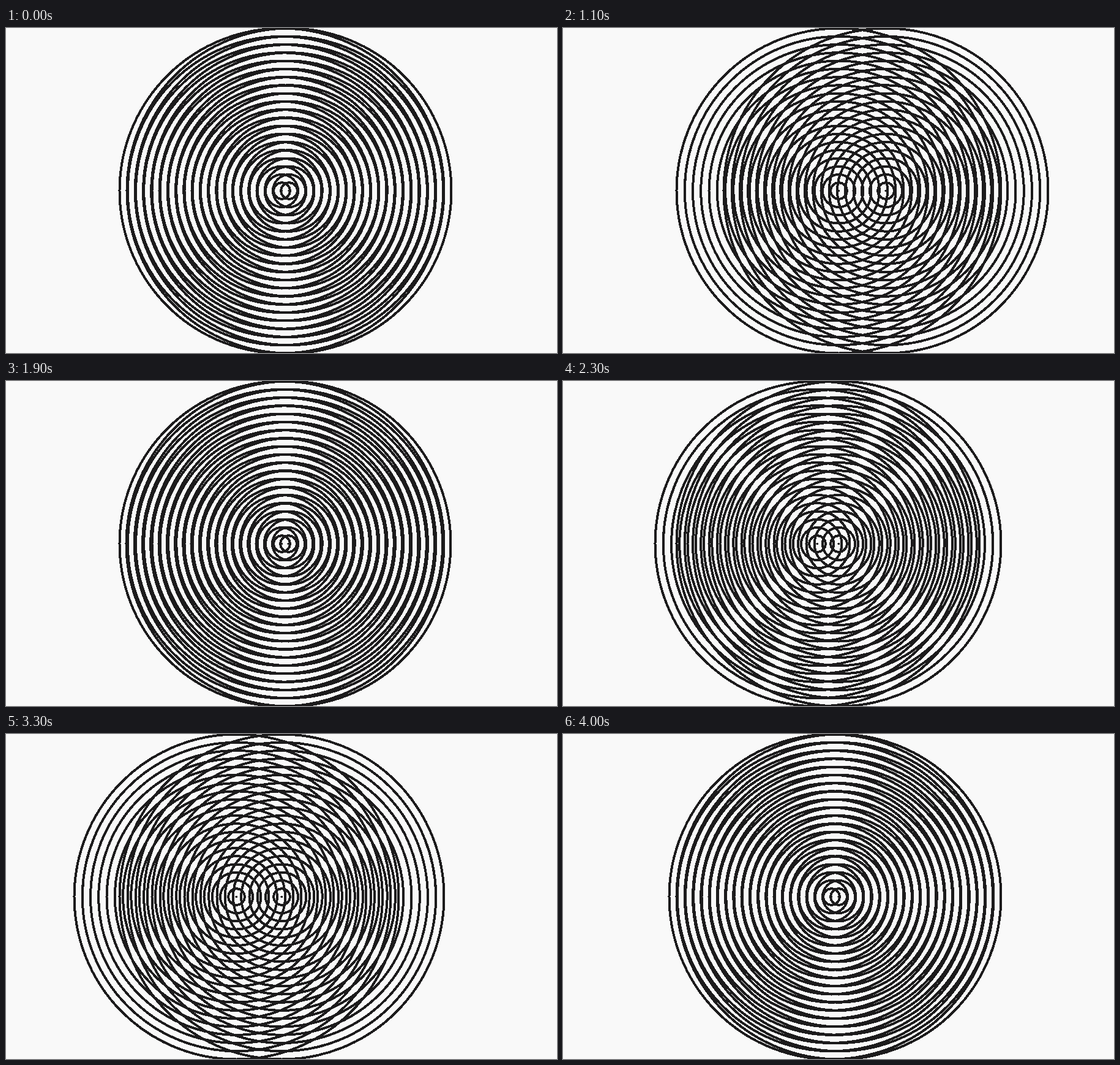
An HTML page for the animation above (4.1 s loop, 900 by 530 pixels).

```html
<!DOCTYPE html>
<html lang="en">
<head>
<meta charset="utf-8">
<title>Moire rings</title>
<style>
  html, body { margin: 0; width: 100%; height: 100%; overflow: hidden; background: #f9f9f9; }
  svg { display: block; width: 900px; height: 530px; }
  circle { fill: none; stroke: #1c1b1c; stroke-width: 4; shape-rendering: crispEdges; }
  .dot { fill: #1c1b1c; stroke: none; }
</style>
</head>
<body>
<svg viewBox="0 0 900 530">
  <g id="still"></g>
  <g id="slider"></g>
</svg>
<script>
  const LOOP = 4100, STEP = 100;
  const CX = 450.5, CY = 265.5, GAP = 13.25, RINGS = 20;
  const SWING = 79.4, PERIOD = 4205, CROSSING = 1995;

  const still = document.getElementById('still');
  const slider = document.getElementById('slider');

  function addCircle(group, r, cls) {
    const c = document.createElementNS('http://www.w3.org/2000/svg', 'circle');
    c.setAttribute('cx', CX);
    c.setAttribute('cy', CY);
    c.setAttribute('r', r);
    if (cls) c.setAttribute('class', cls);
    group.appendChild(c);
  }

  for (const group of [still, slider]) {
    addCircle(group, 2, 'dot');
    for (let i = 1; i <= RINGS; i++) addCircle(group, i * GAP);
  }

  // Whole-pixel sine swing, moving to the left as it passes the middle.
  function offsetAt(t) {
    return Math.floor(-SWING * Math.sin(2 * Math.PI * (t - CROSSING) / PERIOD));
  }

  function draw() {
    const t = Math.floor(performance.now() % LOOP / STEP) * STEP;
    slider.setAttribute('transform', `translate(${offsetAt(t)} 0)`);
    requestAnimationFrame(draw);
  }
  draw();
</script>
</body>
</html>
```
